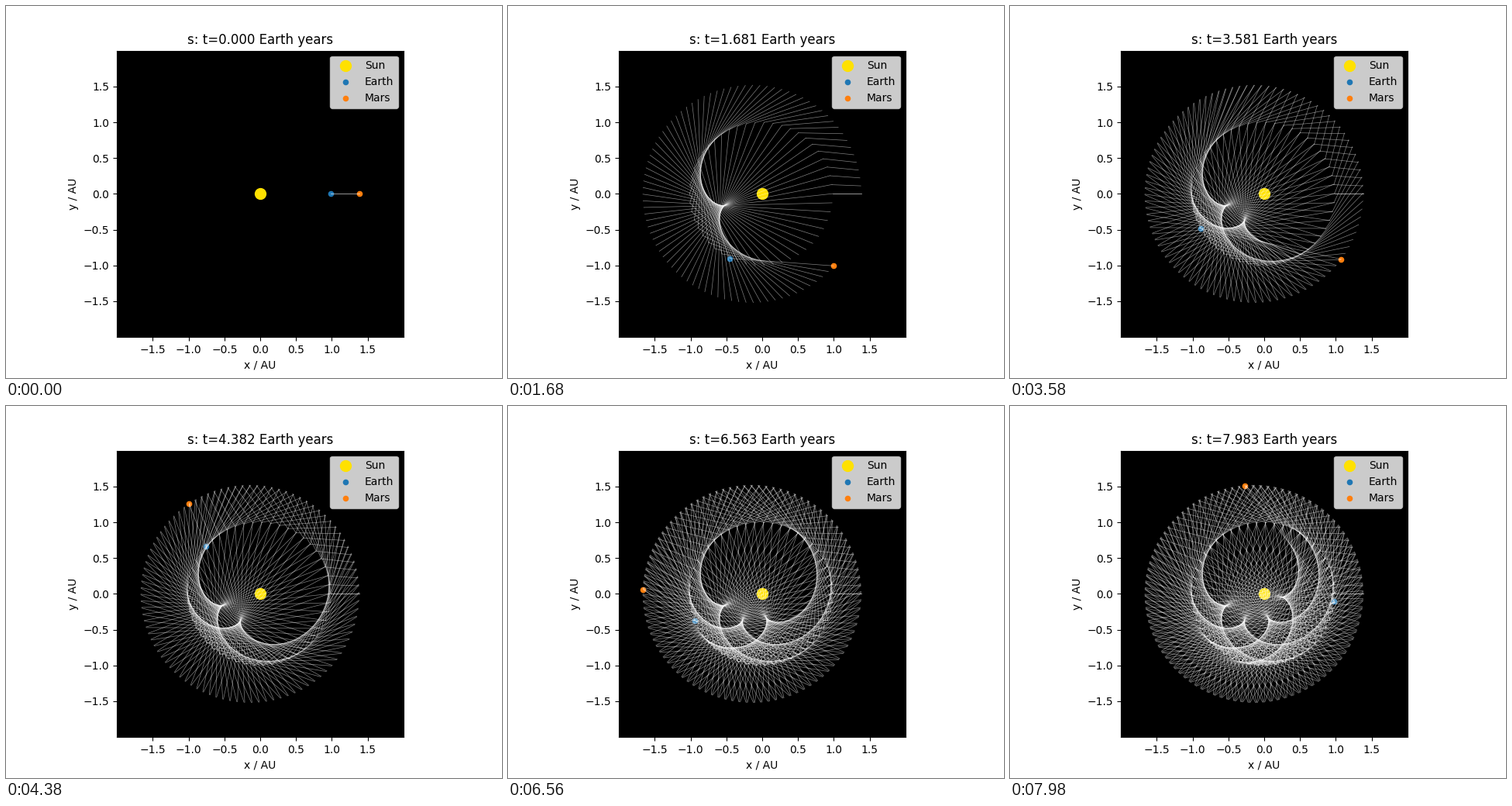
Recreate the animation shown at these times as a matplotlib script. Size 640 by 480 pixels, loop 8000 ms.

```python
import numpy as np
import matplotlib.pyplot as plt
from matplotlib.animation import FuncAnimation
from matplotlib.collections import LineCollection

FRAMES = 400
DT = 50 / 2499  # years per frame


def orbit(t, a, e, period):
    """Kepler orbit around the origin, starting at perihelion on the x axis."""
    m = 2 * np.pi * t / period
    ecc = m.copy()
    for _ in range(8):
        ecc -= (ecc - e * np.sin(ecc) - m) / (1 - e * np.cos(ecc))
    x = a * (np.cos(ecc) - e)
    y = a * np.sqrt(1 - e * e) * np.sin(ecc)
    return np.column_stack([x, y])


t = np.arange(FRAMES) * DT
earth_xy = orbit(t, 1.0, 0.0167, 1.0)
mars_xy = orbit(t, 1.5235, 0.0934, 1.8788)
links = np.stack([earth_xy, mars_xy], axis=1)
links = np.concatenate([links[:1], links])  # the first link is drawn twice

fig, ax = plt.subplots(figsize=(6.4, 4.8), dpi=100)
ax.set_facecolor("black")
ax.set_aspect("equal")
ax.set_xlim(-2, 2)
ax.set_ylim(-2, 2)
ticks = np.arange(-1.5, 1.6, 0.5)
ax.set_xticks(ticks)
ax.set_yticks(ticks)
ax.set_xlabel("x / AU")
ax.set_ylabel("y / AU")

ax.scatter([0], [0], s=100, color="#ffe100", label="Sun")
earth = ax.scatter(*earth_xy[:1].T, s=20, color="C0", label="Earth")
mars = ax.scatter(*mars_xy[:1].T, s=20, color="C1", label="Mars")
web = LineCollection([], colors="white", linewidths=0.5, alpha=0.5,
                     capstyle="projecting", zorder=2)
ax.add_collection(web, autolim=False)
ax.legend(loc="upper right")
title = ax.set_title("")


def update(i):
    earth.set_offsets(earth_xy[i:i + 1])
    mars.set_offsets(mars_xy[i:i + 1])
    web.set_segments(links[:i + 2])
    title.set_text(f"s: t={t[i]:.3f} Earth years")
    return earth, mars, web, title


anim = FuncAnimation(fig, update, frames=FRAMES, interval=20, repeat=True,
                     repeat_delay=0, blit=False)
plt.show()
```
